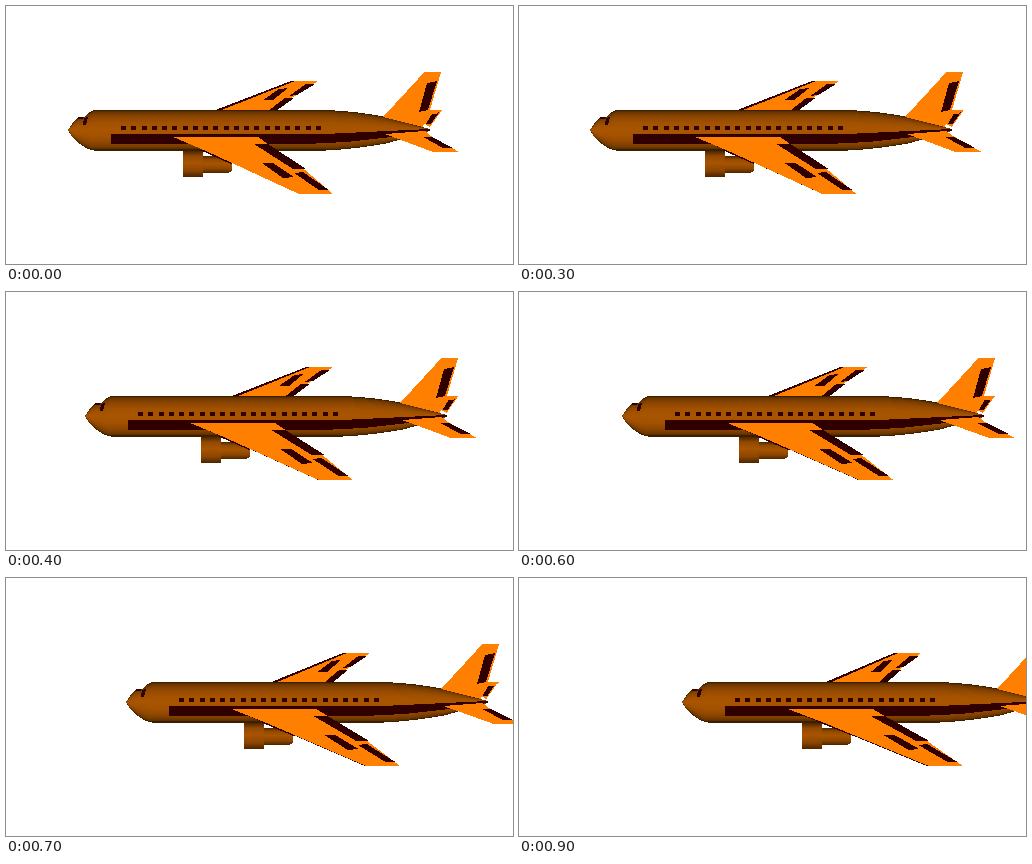
An HTML page that plays this animation: 507 px wide and 258 px high, repeating every 1000 ms.

```html
<!DOCTYPE html>
<html lang="en">
<head>
<meta charset="utf-8">
<title>Airliner</title>
<style>
  html, body { margin: 0; width: 100%; height: 100%; overflow: hidden; background: #fff; }
  svg { display: block; width: 507px; height: 258px; shape-rendering: crispEdges; fill: #ff8000; }
  .dark { fill: #300000; }
  .round { fill: url(#shade); }
</style>
</head>
<body>
<svg viewBox="0 0 507 258">
  <defs>
    <linearGradient id="shade" x2="0" y2="1">
      <stop offset="0" stop-color="#4a2500"/>
      <stop offset=".2" stop-color="#924900"/>
      <stop offset=".45" stop-color="#a85400"/>
      <stop offset=".75" stop-color="#8c4600"/>
      <stop offset="1" stop-color="#4a2500"/>
    </linearGradient>
    <path id="hull" d="M62 124L68 115L73 111L78 111L82 107L88 104H320Q350 105 380 111L424 123V125L380 137.5Q350 143 320 144.5H88Q80 143 74 138L66 131Z"/>
    <path id="wing" d="M167 131H252L262 138L299 164L327 188H293L200 145Z"/>
  </defs>

  <!-- far wing -->
  <g data-pivot="120" data-skew=".0024">
    <path d="M207 105L285 75H312L264 106Z"/>
    <path class="dark" d="M207 105L285 75H289L213 105ZM257 94L273 83L282 82L267 94ZM262 105L279 92H288L270 105ZM283 90L300 78H309L291 89Z"/>
  </g>

  <!-- engine -->
  <g data-gain="1.05">
    <path class="round" d="M196 150H222L226 153V165L222 167H196Z"/>
    <path class="round" d="M177 145H197V171H177Z"/>
  </g>

  <!-- far tailplane -->
  <g data-gain=".97">
    <path d="M408 112L425 104H436L424 121Z"/>
    <path class="dark" d="M426 108L434 105L425 118H420Z"/>
  </g>

  <!-- fuselage and fin -->
  <g>
    <g id="fuselage"></g>
    <path class="dark" d="M105 128H318L424 123V125L416 126L385 131L340 136L300 138H105ZM78 112L82 111L80 119H77ZM72 111H77V113H72Z"/>
    <path id="windows" class="dark"/>
    <path d="M377 111L418.500 66H435L424 104H436L430 108H421L417 121Z"/>
    <path class="dark" d="M421 77L431 75L422 104L413 106Z"/>
  </g>

  <!-- near tailplane -->
  <g data-pivot="126" data-skew=".0025">
    <path d="M379 128L419 125L423 129L453 146H427Z"/>
    <path class="dark" d="M417 131H426L447 142H437Z"/>
  </g>

  <!-- near wing, its underside lagging slightly behind -->
  <g data-gain=".98" data-pivot="128" data-skew=".0026">
    <use href="#wing" class="dark"/>
  </g>
  <g data-pivot="128" data-skew=".0026">
    <path class="dark" d="M194 144L225 158L228 156L200 144Z"/>
    <use href="#wing"/>
    <path class="dark" d="M248 138H262L300 163H287ZM256 157H267L288 171L277 172ZM288 167L297 166L323 184H313Z"/>
  </g>
</svg>
<script>
  const parts = [...document.querySelectorAll('svg > g')];
  const list = (length, make) => Array.from({ length }, (_, i) => make(i)).join('');

  // Nested hulls, flattened towards the axis, shade the body as a round solid.
  const LAYERS = 20, AXIS = 124;
  document.getElementById('fuselage').innerHTML = list(LAYERS, i => {
    const height = 1 - i / LAYERS;
    const red = 168 * (.36 + .64 * Math.sqrt(1 - height ** 2));
    return `<use href="#hull" fill="rgb(${red},${red / 2},0)"
      transform="matrix(1 0 0 ${height} 0 ${AXIS * (1 - height)})"/>`;
  });

  document.getElementById('windows').setAttribute('d',
    list(20, i => `M${Math.round(115 + i * 10.26)} 120h5v4h-5z`));

  // Accelerating travel in tenths of the loop; the first step stays at rest.
  const travel = step => step < 2 ? 0 : Math.round(.93 * step ** 2 + .0355 * step ** 3);

  // Nearer parts travel further; wings shear because their depth varies with y.
  function place(part, distance) {
    const { gain = 1, pivot = 0, skew = 0 } = part.dataset;
    const shear = skew * distance;
    part.setAttribute('transform', `matrix(1 0 ${shear} 1 ${gain * distance - shear * pivot} 0)`);
  }

  function draw() {
    const distance = travel(Math.floor(performance.now() % 1000 / 100));
    parts.forEach(part => place(part, distance));
    requestAnimationFrame(draw);
  }
  draw();
</script>
</body>
</html>
```
